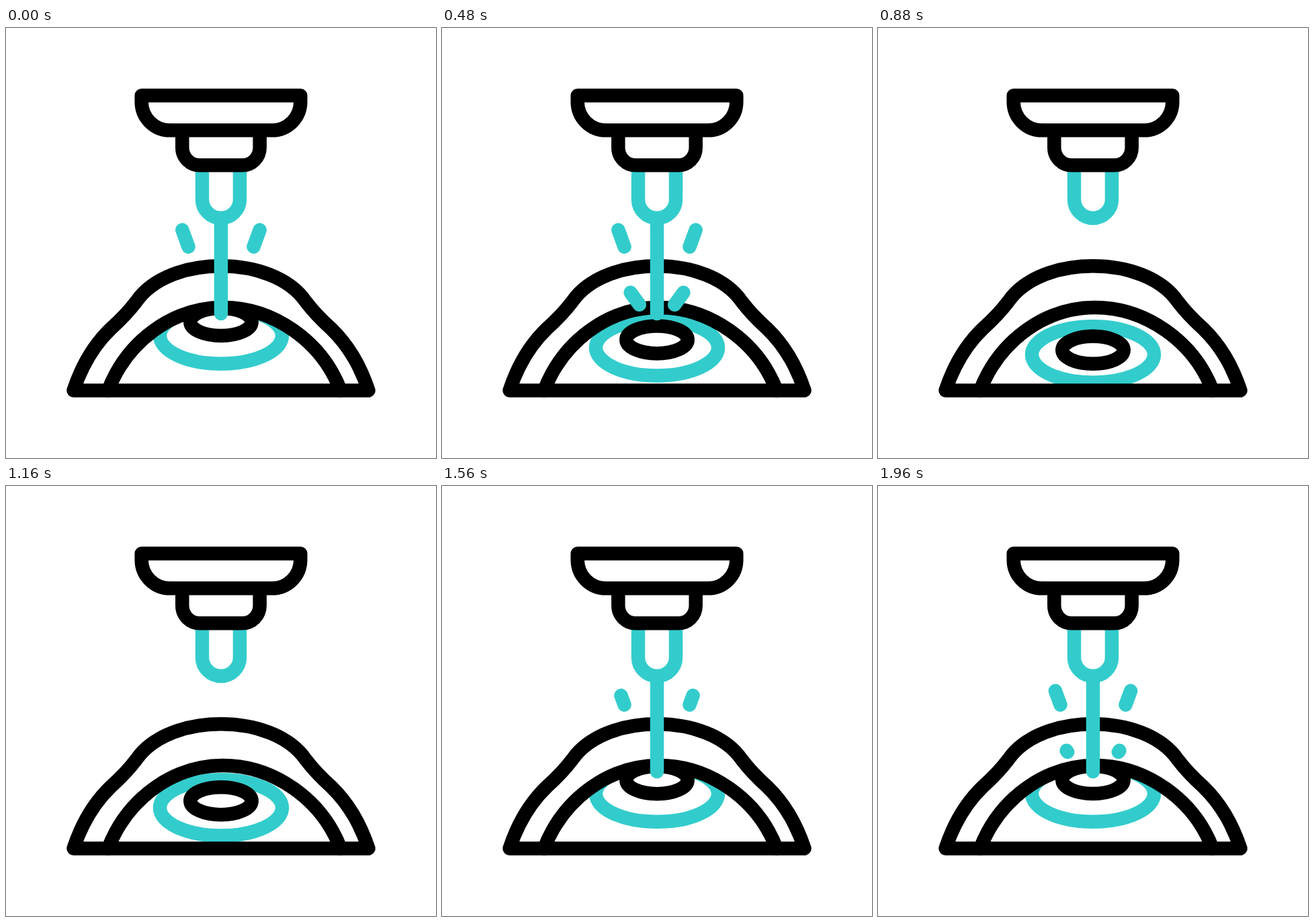
Write an HTML page that moves like this. It is 640 by 640 pixels and loops after 2 s.

```html
<!DOCTYPE html>
<html lang="en">
<head>
<meta charset="utf-8">
<title>Laser eye surgery</title>
<style>
  html, body { margin: 0; width: 100%; height: 100%; overflow: hidden; background: #fff; }
  svg { display: block; width: 100%; height: 100%; fill: none; stroke: #000; stroke-width: 20.5; stroke-linecap: round; stroke-linejoin: round; }
  .teal { stroke: #33cccc; }
</style>
</head>
<body>
<svg viewBox="0 0 640 640">
  <clipPath id="eye"><path d="M152 539.5C180 466 248 416 323 416S470 466 498 539.5Z"/></clipPath>

  <!-- laser head -->
  <path class="teal" d="M292 206V255A28 28 0 0 0 348 255V206"/>
  <path d="M262.3 152.3V178.3A26 26 0 0 0 288.3 204.3H351.7A26 26 0 0 0 377.7 178.3V152.3"/>
  <path d="M201.7 100.5H438.3V110A42.3 42.3 0 0 1 396 152.3H244A42.3 42.3 0 0 1 201.7 110Z"/>

  <!-- eye -->
  <g clip-path="url(#eye)">
    <ellipse id="iris" class="teal" cx="320" cy="458" rx="91" ry="41.7"/>
    <ellipse id="pupil" cx="320" cy="437.5" rx="45.7" ry="20.5"/>
  </g>
  <path d="M152 539.5C180 466 248 416 323 416S470 466 498 539.5"/>
  <path d="M100.5 539.5C112.5 503 132.5 470 156.5 447C170 435 181 424 194 407C219 371 270 354.3 320 354.3S421 371 446 407C459 424 470 435 483.5 447C507.5 470 527.5 503 539.5 539.5Z"/>

  <!-- light -->
  <path id="beam" class="teal"/>
  <path id="upper" class="teal"/>
  <path id="lower" class="teal"/>
</svg>
<script>
const LOOP = 2000, STEP = 40, HALF = 150;
const el = id => document.getElementById(id);
const iris = el('iris'), pupil = el('pupil'), beam = el('beam');

const rays = [
  { path: el('upper'), from: [271.5, 325.6], to: [262.3, 300.5], peaks: [1630, 2000, 2480] },
  { path: el('lower'), from: [296.7, 415.7], to: [280.5, 393.7], peaks: [1840, 2150, 2440, 2730] }
];

const progress = (t, a, b) => Math.min(1, Math.max(0, (t - a) / (b - a)));
const mix = (a, b, k) => a + (b - a) * k;
const smooth = x => x * x * (3 - 2 * x);

// cubic-bezier(.333, 0, .38, 1)
function glide(x) {
  let lo = 0, hi = 1;
  for (let i = 0; i < 24; i++) {
    const u = (lo + hi) / 2, v = 1 - u;
    if (3 * v * v * u * .333 + 3 * v * u * u * .38 + u * u * u < x) lo = u;
    else hi = u;
  }
  return smooth(lo);
}

// Each ray grows upwards until its peak, then shrinks to its upper end.
function drawRay(ray, t) {
  const { path, from, to, peaks } = ray;
  const peak = peaks.find(p => Math.abs(t - p) < HALF);
  if (peak === undefined) return path.setAttribute('d', '');
  const tail = smooth(progress(t, peak, peak + HALF));
  const tip = smooth(progress(t, peak - HALF, peak));
  const at = k => [mix(from[0], to[0], k), mix(from[1], to[1], k)];
  const [x1, y1] = at(tail), [x2, y2] = at(tip);
  path.setAttribute('d', `M${x1} ${y1}L${x2} ${y2}M${640 - x1} ${y1}L${640 - x2} ${y2}`);
}

function draw(t) {
  const down = glide(progress(t, 200, 800)) - glide(progress(t, 1000, 1600));
  iris.setAttribute('cy', 458 + 28 * down);
  pupil.setAttribute('cy', 437.5 + 41.8 * down);

  const top = t < 1000 ? smooth(progress(t, 640, 880)) : 0;
  const end = t < 1000 ? 1 : smooth(progress(t, 1240, 1480));
  beam.setAttribute('d', end > top ? `M320 ${mix(283, 425, top)}V${mix(283, 425, end)}` : '');

  // The rays keep pulsing across the loop's seam.
  for (const ray of rays) drawRay(ray, t < 1000 ? t + LOOP : t);
}

const start = performance.now();
function tick() {
  const t = (performance.now() - start) % LOOP;
  draw(Math.floor(t / STEP) * STEP);
  requestAnimationFrame(tick);
}
tick();
</script>
</body>
</html>
```
